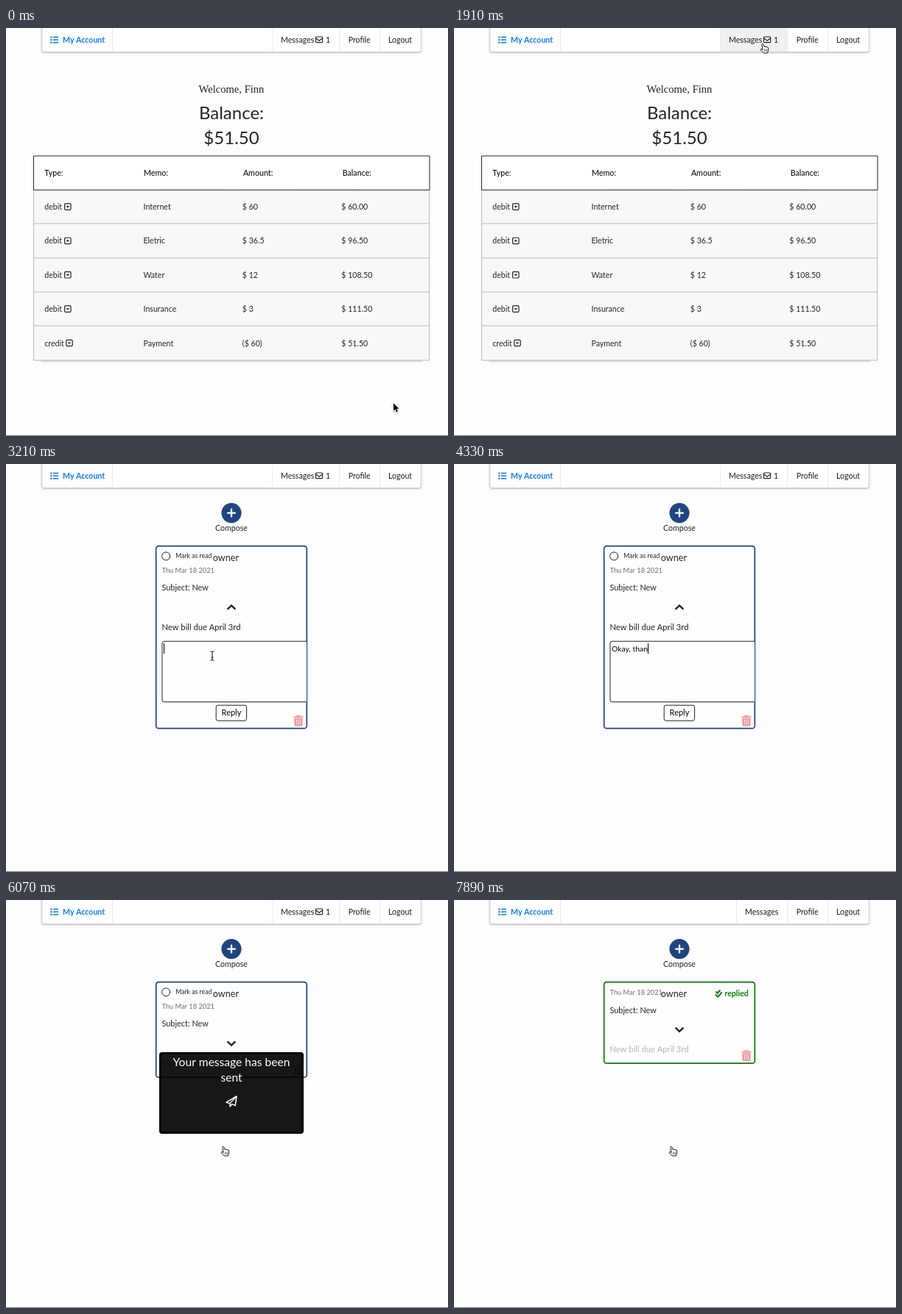
An HTML page with a canvas for the animation above (8.2 s loop, 600 by 555 pixels).

```html
<!DOCTYPE html>
<html lang="en">
<head>
<meta charset="utf-8">
<title>My Account</title>
<style>
html, body { margin: 0; width: 100%; height: 100%; overflow: hidden; background: #fdfcfe; }
canvas { display: block; width: 600px; height: 555px; }
</style>
</head>
<body>
<canvas id="stage"></canvas>
<script>
const LOOP = 8200, W = 600, H = 555;
const SANS = 'Lato, "Open Sans", sans-serif';
const SERIF = '"Liberation Serif", serif';
const INK = '#212529', NAVY = '#1f4680', GREEN = '#078007', BLUE = '#087bf5';
const OPEN_PAGE = 2080, EXPAND = 2950, FOCUS = 3210, SENT = 6070, POPUP_END = 7580, REPLIED = 7740;

const canvas = document.getElementById('stage');
const dpr = window.devicePixelRatio || 1;
canvas.width = W * dpr;
canvas.height = H * dpr;
const c = canvas.getContext('2d');

// Pointer hot spot: time, x, y
const TRACK = [
  [40, 526, 510.5], [350, 512, 468], [560, 492, 410], [690, 477, 349],
  [740, 462, 240], [780, 447, 130], [820, 437, 67], [1080, 424, 31],
  [1300, 419, 21], [2080, 419, 21], [2400, 381, 66], [2850, 306, 193],
  [2960, 306, 195], [3200, 280, 261], [4940, 280, 261], [5270, 292, 326],
  [5400, 292, 327], [5760, 295, 335]
];

function pointer(t) {
  const i = TRACK.findIndex(k => k[0] > t);
  if (i < 0) return TRACK[TRACK.length - 1].slice(1);
  if (i === 0) return TRACK[0].slice(1);
  const [t0, x0, y0] = TRACK[i - 1], [t1, x1, y1] = TRACK[i];
  const k = (t - t0) / (t1 - t0);
  return [x0 + (x1 - x0) * k, y0 + (y1 - y0) * k];
}

const inside = ([x, y], l, t, r, b) => x >= l && x < r && y >= t && y < b;

function text(s, x, y, size, { color = INK, weight = 400, align = 'left', family = SANS } = {}) {
  c.font = `${weight} ${size}px ${family}`;
  c.fillStyle = color;
  c.textAlign = align;
  c.fillText(s, x, y);
  return c.measureText(s).width;
}

function rect(x, y, w, h, color) {
  c.fillStyle = color;
  c.fillRect(x, y, w, h);
}

function box(x, y, w, h, r, { fill, stroke, width = 1 }) {
  c.beginPath();
  c.roundRect(x, y, w, h, r);
  if (fill) { c.fillStyle = fill; c.fill(); }
  if (stroke) { c.strokeStyle = stroke; c.lineWidth = width; c.stroke(); }
}

function line(points, color, width, { closed = false, cap = 'butt', join = 'miter' } = {}) {
  c.beginPath();
  points.forEach(([x, y]) => c.lineTo(x, y));
  if (closed) c.closePath();
  c.strokeStyle = color;
  c.lineWidth = width;
  c.lineCap = cap;
  c.lineJoin = join;
  c.stroke();
}

function shape(points, color) {
  c.beginPath();
  points.forEach(([x, y]) => c.lineTo(x, y));
  c.closePath();
  c.fillStyle = color;
  c.fill();
}

function at(x, y, draw) {
  c.save();
  c.translate(x, y);
  draw();
  c.restore();
}

function shadowed(color, blur, dy, draw) {
  c.save();
  c.shadowColor = color;
  c.shadowBlur = blur * dpr;
  c.shadowOffsetY = dy * dpr;
  draw();
  c.restore();
}

function drawNav(t) {
  const done = t >= REPLIED, left = done ? 383 : 361;
  shadowed('rgba(34,36,38,.22)', 2, 1, () =>
    box(48.5, -6, 515, 38.5, 3, { fill: '#fff', stroke: '#d6d6d8' }));
  if (t > 1100 && t < 2400) {
    const alpha = Math.min(1, (t - 1100) / 120, (2400 - t) / 120);
    rect(left + 0.5, 0, 90.5, 32, `rgba(0,0,0,${0.055 * alpha})`);
  }
  [144, left, 452, 507].forEach(x => rect(x, 0, 1, 32, '#ededee'));

  for (let i = 0; i < 3; i++) {
    rect(60.3, 11.4 + i * 3.7, 2.1, 2.1, BLUE);
    rect(63.8, 11.7 + i * 3.7, 7.4, 1.5, BLUE);
  }
  text('My Account', 77, 19.5, 10.6, { color: BLUE, weight: 700 });
  const ink = { color: '#1c1c1d' };
  text('Messages', done ? 395 : 373, 19.5, 10.6, ink);
  if (!done) {
    box(420.5, 12, 9.2, 7.6, 1, { stroke: '#1c1c1d', width: 1.1 });
    line([[420.7, 14], [425.1, 17.3], [429.5, 14]], '#1c1c1d', 1.1);
    text('1', 434, 19.5, 10.6, ink);
  }
  text('Profile', 464.7, 19.5, 10.6, ink);
  text('Logout', 519, 19.5, 10.6, ink);
}

const ROWS = [
  ['debit', 'Internet', '$ 60', '$ 60.00'],
  ['debit', 'Eletric', '$ 36.5', '$ 96.50'],
  ['debit', 'Water', '$ 12', '$ 108.50'],
  ['debit', 'Insurance', '$ 3', '$ 111.50'],
  ['credit', 'Payment', '($ 60)', '$ 51.50']
];
const ROW_TOP = 220.5, ROW_H = 46.35;

function caretBox(x, y) {
  box(x + 0.6, y + 0.6, 8.4, 8.4, 1.2, { stroke: '#222', width: 1.2 });
  shape([[x + 2.5, y + 3.8], [x + 7.1, y + 3.8], [x + 4.8, y + 6.4]], '#222');
}

function drawAccount(t) {
  text('Welcome, Finn', 306, 87.5, 14.6, { align: 'center', family: SERIF });
  text('Balance:', 306, 124, 24, { align: 'center' });
  text('$51.50', 306, 158, 24, { align: 'center' });

  shadowed('rgba(0,0,0,.3)', 3, 1, () => rect(47, 440, 518, 12, '#f8f8f9'));
  rect(37, ROW_TOP, 538, ROW_H * 5, '#f8f8f9');
  const hot = pointer(t - 45);
  ROWS.forEach((row, i) => {
    const top = ROW_TOP + i * ROW_H, base = top + 26.6;
    if (inside(hot, 441, top, 575, top + ROW_H)) rect(441, top, 134, ROW_H, '#e2e7ec');
    [52.3, 186.5, 320.8, 455.3].forEach((x, k) => text(row[k], x, base, 10.6));
    caretBox(i < 4 ? 79 : 81.2, top + 17.8);
    const y = Math.round(top + ROW_H - 0.5);
    rect(37, y - 0.5, 538, 1, '#bcbcbe');
  });
  rect(37, 220, 1, 232, '#bcbcbe');
  rect(574, 220, 1, 232, '#bcbcbe');
  box(37.5, 174, 537.5, 46.3, 0, { fill: '#fff', stroke: '#222' });
  ['Type:', 'Memo:', 'Amount:', 'Balance:'].forEach((s, i) =>
    text(s, 52.3 + i * 134.8, 200.8, 10.7, { color: '#000' }));
}

function chevron(y, up) {
  const d = up ? -2.6 : 2.6;
  line([[300.6, y - d], [306, y + d], [311.4, y - d]], INK, 2.4);
}

function trash(y) {
  const pink = '#f29a9a';
  rect(390.5, y + 1.5, 13, 1.8, pink);
  line([[394.2, y + 1.8], [395, y + 0.5], [399, y + 0.5], [399.8, y + 1.8]], pink, 1.2);
  box(391.4, y + 4, 11.2, 10.6, [0, 0, 1.5, 1.5], { fill: pink });
  [394, 396.6, 399.2].forEach(x => rect(x, y + 5.7, 0.9, 7, '#fdeeee'));
}

function check(x, y, s) {
  line([[x, y + 2.4 * s], [x + 2.5 * s, y + 5 * s], [x + 7 * s, y]], GREEN, 2);
}

const REPLY = 'Okay, thanks!';

function typed(t) {
  if (t < 3600) return '';
  if (t >= 4680) return REPLY;
  if (t >= 4460) return REPLY.slice(0, 12);
  return REPLY.slice(0, Math.min(11, 1 + Math.floor((t - 3600) / 78)));
}

function drawReplyForm(t) {
  c.save();
  c.beginPath();
  c.rect(204, 235, 204, 100);
  c.clip();
  box(212, 241.2, 220, 82.5, 3, { fill: '#fefdff', stroke: '#222' });
  c.restore();
  const w = text(typed(t), 214, 254.6, 10.4, { color: '#000' });
  if (t >= FOCUS && t < 5760) rect(214 + w, 244, 1, 14, '#000');
  box(285.2, 328.2, 41.4, 21, 2.5, { fill: '#fff', stroke: '#222' });
  text('Reply', 306, 342.2, 11, { align: 'center', color: '#000' });
}

function drawMessages(t) {
  c.beginPath();
  c.arc(306, 66.6, 13.6, 0, Math.PI * 2);
  c.fillStyle = NAVY;
  c.fill();
  line([[301, 66.6], [311, 66.6]], '#fff', 2.3, { cap: 'round' });
  line([[306, 61.6], [306, 71.6]], '#fff', 2.3, { cap: 'round' });
  text('Compose', 306, 91.4, 10.6, { align: 'center' });

  const open = t >= EXPAND && t < SENT, done = t >= REPLIED;
  const bottom = open ? 360.5 : done ? 223 : 242;
  const lift = done ? 18.7 : 0;
  box(203.7, 111.7, 204.6, bottom - 112.5, 3.5,
    { fill: '#fefdff', stroke: done ? GREEN : NAVY, width: 1.7 });

  if (done) {
    check(355.5, 122.5, 0.85);
    check(355, 125.5, 1.25);
    text('replied', 367.4, 131, 10.6, { color: GREEN, weight: 700 });
  } else {
    c.beginPath();
    c.arc(217.2, 125.4, 5.5, 0, Math.PI * 2);
    c.strokeStyle = '#222';
    c.lineWidth = 1;
    c.stroke();
    text('Mark as read', 230.2, 128, 8.7);
  }
  text('owner', 280.8, 132.4, 12.6);
  text('Thu Mar 18 2021', 211.5, 147.6 - lift, 9.25, { color: '#6f7072' });
  text('Subject: New', 211.5, 172.2 - lift, 10.9);
  chevron(195 - lift, open);
  text('New bill due April 3rd', 211.5, 226 - lift, 11.2, { color: open ? INK : '#b4b4b7' });
  if (open) drawReplyForm(t);
  trash(bottom - 18.7);
  if (t >= SENT && t < POPUP_END) drawPopup();
}

function drawPopup() {
  box(208, 207, 196, 111, 4, { fill: 'rgba(0,0,0,.91)' });
  box(209.5, 208.5, 193, 108, 3, { stroke: 'rgba(0,0,0,.85)', width: 3 });
  const white = { color: '#fff', align: 'center' };
  text('Your message has been', 306, 226.4, 15.6, white);
  text('sent', 306, 247.4, 15.6, white);
  line([[299, 275.2], [313, 267], [311.2, 279.6], [306.6, 277.6], [304.2, 281], [303.8, 276.7]],
    '#fff', 1.5, { closed: true, join: 'round' });
  line([[303.8, 276.7], [313, 267]], '#fff', 1.3);
}

function arrow() {
  const p = [[0, 0], [0, 10.3], [2.4, 8.1], [4, 11.9], [5.9, 11.1], [4.3, 7.5], [7.3, 7.3]];
  shadowed('rgba(0,0,0,.35)', 2, 1, () => line(p, '#fff', 1.6, { closed: true, join: 'round' }));
  shape(p, '#000');
}

function hand() {
  c.beginPath();
  c.moveTo(-1.1, 1.3);
  c.bezierCurveTo(-0.8, 0, 0.7, 0, 1, 1.3);
  c.lineTo(2.1, 4.4);
  c.quadraticCurveTo(3.2, 3.6, 4, 4.6);
  c.quadraticCurveTo(5.2, 3.8, 5.8, 5);
  c.quadraticCurveTo(7.5, 4.7, 7.7, 6.3);
  c.lineTo(7.6, 9.2);
  c.lineTo(6.6, 13);
  c.lineTo(1.2, 13);
  c.lineTo(-2.6, 9);
  c.bezierCurveTo(-3.5, 7.8, -2, 7, -0.9, 8);
  c.lineTo(0.2, 8.6);
  c.closePath();
  c.fillStyle = '#fff';
  c.fill();
  c.strokeStyle = '#111';
  c.lineWidth = 1;
  c.lineJoin = 'round';
  c.stroke();
  [2.4, 4, 5.6].forEach(x => line([[x, 8], [x, 11]], '#333', 0.7));
}

function beam() {
  const ends = s => line([[-2.6, 6.2 * s], [-0.9, 6 * s], [0, 5 * s], [0.9, 6 * s], [2.6, 6.2 * s]], '#111', 1);
  ends(-1);
  ends(1);
  line([[0, -5], [0, 5]], '#111', 1);
  line([[-1.5, 2], [1.5, 2]], '#111', 0.9);
}

function drawPointer(t) {
  if (t >= 3380 && t < 4940) return;
  const p = pointer(t);
  const open = t >= EXPAND && t < SENT;
  let draw = arrow;
  if (t >= 5250 || inside(p, 361, 0, 452, 33) ||
      (t >= OPEN_PAGE && inside(p, 296, 187, 316, 203))) draw = hand;
  else if (open && inside(p, 212, 241, 408, 324)) draw = beam;
  at(p[0], p[1], draw);
}

function render(t) {
  c.setTransform(dpr, 0, 0, dpr, 0, 0);
  rect(0, 0, W, H, '#fdfcfe');
  rect(0, 554, W, 1, '#77777a');
  drawNav(t);
  if (t < OPEN_PAGE) drawAccount(t);
  else drawMessages(t);
  drawPointer(t);
}

const start = performance.now();
function tick() {
  render((performance.now() - start) % LOOP);
  requestAnimationFrame(tick);
}
tick();
</script>
</body>
</html>
```
